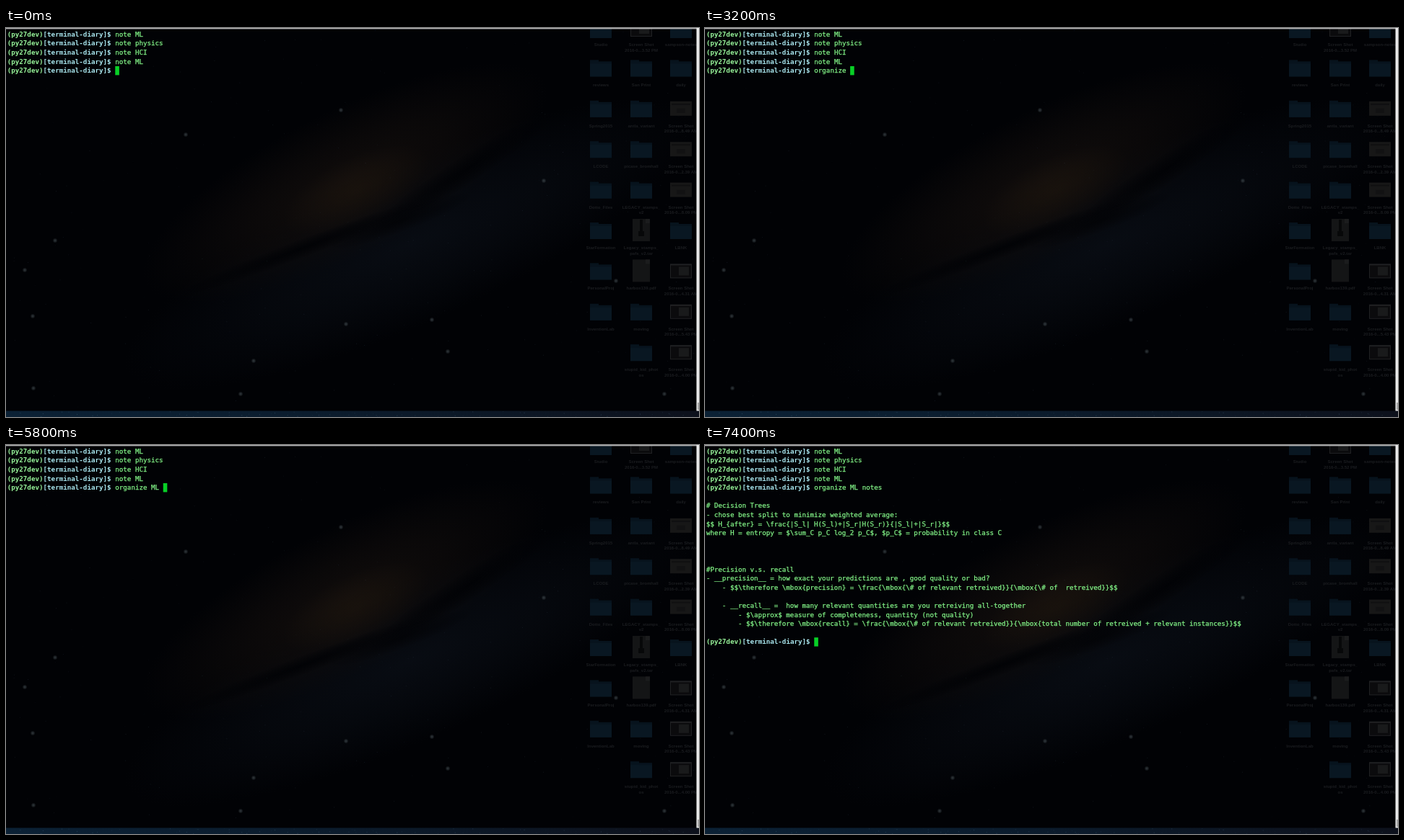
Recreate the animation shown at these times as an HTML page with a canvas. Size 960x540 px, loop 7.6 s.

```html
<!DOCTYPE html>
<html lang="en">
<head>
<meta charset="utf-8">
<title>Terminal notes</title>
<style>
html, body { margin: 0; width: 100%; height: 100%; overflow: hidden; background: #010205; }
canvas { position: absolute; left: 0; top: 0; }
</style>
</head>
<body>
<canvas id="desktop" width="960" height="540"></canvas>
<canvas id="terminal" width="960" height="540"></canvas>
<script>
const LOOP = 7600, CELL = 5.539, ROW = 12.6, LEFT = 1.7;
const FONT = '9.2px "DejaVu Sans Mono", monospace';
const bg = document.getElementById('desktop').getContext('2d');
const term = document.getElementById('terminal').getContext('2d');

let seed = 17;
const random = () => (seed = (seed * 16807) % 2147483647) / 2147483647;

function rect(ctx, color, x, y, w, h) {
  ctx.fillStyle = color;
  ctx.fillRect(x, y, w, h);
}

function glow(x, y, rx, ry, angle, rgb, alpha) {
  bg.save();
  bg.translate(x, y);
  bg.rotate(angle);
  bg.scale(rx, ry);
  const g = bg.createRadialGradient(0, 0, 0, 0, 0, 1);
  g.addColorStop(0, `rgba(${rgb},${alpha})`);
  g.addColorStop(0.5, `rgba(${rgb},${alpha * 0.55})`);
  g.addColorStop(1, `rgba(${rgb},0)`);
  rect(bg, g, -1, -1, 2, 2);
  bg.restore();
}

function drawSky() {
  rect(bg, '#010205', 0, 0, 960, 540);
  glow(560, 300, 430, 110, -0.42, '9,13,20', 0.9);
  glow(470, 215, 310, 100, -0.47, '20,15,13', 0.85);
  glow(485, 225, 110, 45, -0.45, '30,22,14', 0.6);
  glow(410, 306, 220, 13, -0.36, '1,2,5', 0.9);
  glow(640, 195, 170, 20, -0.58, '1,2,5', 0.9);
  glow(545, 268, 110, 16, -0.35, '2,3,6', 0.8);
  for (let i = 0; i < 220; i++) {
    rect(bg, `rgba(90,110,130,${0.05 + random() * 0.15})`, random() * 955, random() * 530, 1, 1);
  }
  const stars = [[249, 148], [26, 336], [464, 114], [745, 212], [612, 449], [325, 508], [590, 405],
    [343, 462], [68, 295], [37, 400], [38, 500], [845, 351], [471, 411], [912, 508]];
  for (const [x, y] of stars) glow(x, y, 3.5, 3.5, 0, '70,80,85', 0.7);
}

const icons = {
  folder(x, y) {
    rect(bg, '#07131d', x - 15, y - 11, 12, 4);
    rect(bg, '#07131d', x - 15, y - 9, 30, 21);
    rect(bg, '#091722', x - 15, y - 6, 30, 18);
  },
  shot(x, y) {
    rect(bg, '#202123', x - 15, y - 10, 30, 20);
    rect(bg, '#0b0b0d', x - 14, y - 8, 28, 17);
    rect(bg, '#191a1b', x - 3, y - 6, 14, 12);
  },
  pale(x, y) {
    rect(bg, '#171717', x - 15, y - 10, 30, 20);
    rect(bg, '#101011', x - 13, y - 7, 26, 2);
    rect(bg, '#121213', x - 6, y, 12, 6);
  },
  page(x, y) {
    rect(bg, '#141516', x - 12, y - 16, 24, 31);
    rect(bg, '#1b1c1d', x + 6, y - 16, 6, 6);
  },
  zip(x, y) {
    icons.page(x, y);
    rect(bg, '#070809', x - 2, y - 15, 4, 16);
    rect(bg, '#070809', x - 4, y + 1, 8, 7);
  }
};

function drawIcons() {
  const shot = time => 'Screen Shot|2016-0...' + time;
  const columns = [
    [824, ['folder:Studio', 'folder:reviews', 'folder:Spring2015', 'folder:LCODE', 'folder:Dotto_Files',
      'folder:StarFormation', 'folder:PersonalProj', 'folder:InventionLab']],
    [880, ['shot:' + shot('3.52 PM'), 'folder:San Print', 'folder:antla_variant', 'folder:picase_bromhall',
      'folder:LEGACY_stamps_|v2', 'zip:Legacy_stamps_|pafs_v2.tar', 'page:harbox139.pdf',
      'folder:moving', 'folder:stupid_kid_phot|os']],
    [935, ['folder:sampson-notes', 'folder:daily', 'pale:' + shot('8.49 AM'), 'pale:' + shot('2.39 AM'),
      'pale:' + shot('8.09 PM'), 'folder:LBNK', 'shot:' + shot('4.31 AM'), 'shot:' + shot('5.43 PM'),
      'shot:' + shot('4.00 PM')]]
  ];
  bg.font = 'bold 6px "Liberation Sans", Arial, sans-serif';
  bg.textAlign = 'center';
  for (const [x, items] of columns) {
    items.forEach((item, row) => {
      const at = item.indexOf(':'), y = -1 + row * 56.4 + (row ? 0 : 3);
      icons[item.slice(0, at)](x, y);
      bg.fillStyle = '#1b1d20';
      item.slice(at + 1).split('|').forEach((line, i) => bg.fillText(line, x, y + 26 + i * 7.6 - (row ? 0 : 3)));
    });
  }
}

function drawFrame() {
  const strip = bg.createLinearGradient(0, 0, 960, 0);
  strip.addColorStop(0, '#0b2135');
  strip.addColorStop(0.45, '#0b1c2d');
  strip.addColorStop(1, '#0d111c');
  rect(bg, strip, 0, 531.5, 960, 9);
  for (let i = 0; i < 110; i++) {
    rect(bg, `rgba(110,150,180,${random() * 0.3})`, random() * 960, 532 + random() * 8, 1, 1);
  }
  rect(bg, '#b8b8b8', 0, 0, 960, 1.4);
  rect(bg, '#e9e9e9', 956.5, 0, 3.5, 531.5);
  rect(bg, '#a8a8a8', 958, 520, 2, 10);
}

function text(string, col, row, color, bold) {
  const x = LEFT + col * CELL, y = 11.7 + row * ROW;
  term.font = (bold ? 'bold ' : '') + FONT;
  term.fillStyle = term.strokeStyle = color;
  term.fillText(string, x, y);
  if (!bold) term.strokeText(string, x, y);
}

function prompt(row, command = '') {
  text('(py27dev)', 0, row, '#98f59a', true);
  text('[terminal-diary]$', 9, row, '#a9e6ee', true);
  text(command, 27, row, '#83f588');
}

function cursor(col, row) {
  rect(term, '#08d026', LEFT + col * CELL, 2.6 + row * ROW, 5.6, 12.4);
}

const history = ['note ML', 'note physics', 'note HCI', 'note ML'];
const command = 'organize ML notes';
// Time at which each character of the command appears
const keyTimes = [1400, 1600, 1800, 2000, 2200, 2400, 2600, 2800, 3000,
  4000, 4600, 5400, 6000, 6200, 6400, 6600, 6800];
const ENTER = 7200, OUTPUT = 7400;

const notes = String.raw`# Decision Trees
- chose best split to minimize weighted average:
$$ H_{after} = \frac{|S_l| H(S_l)+|S_r|H(S_r)}{|S_l|+|S_r|}$$
where H = entropy = $\sum_C p_C log_2 p_C$, $p_C$ = probability in class C



#Precision v.s. recall
- __precision__ = how exact your predictions are , good quality or bad?
    - $$\therefore \mbox{precision} = \frac{\mbox{\# of relevant retreived}}{\mbox{\# of  retreived}}$$

    - __recall__ =  how many relevant quantities are you retreiving all-together
        - $\approx$ measure of completeness, quantity (not quality)
        - $$\therefore \mbox{recall} = \frac{\mbox{\# of relevant retreived}}{\mbox{total number of retreived + relevant instances}}$$`.split('\n');

function draw() {
  const t = performance.now() % LOOP;
  const typed = keyTimes.filter(time => time <= t).length;
  term.clearRect(0, 0, 960, 540);
  history.forEach((line, row) => prompt(row, line));
  prompt(4, command.slice(0, typed));
  if (t >= OUTPUT) {
    notes.forEach((line, i) => text(line, 0, 6 + i, '#83f588'));
    prompt(21);
    cursor(27, 21);
  } else if (t >= ENTER) {
    cursor(0, 5);
  } else {
    cursor(27 + typed, 4);
  }
  requestAnimationFrame(draw);
}

term.lineWidth = 0.25;
drawSky();
drawIcons();
drawFrame();
draw();
</script>
</body>
</html>
```
